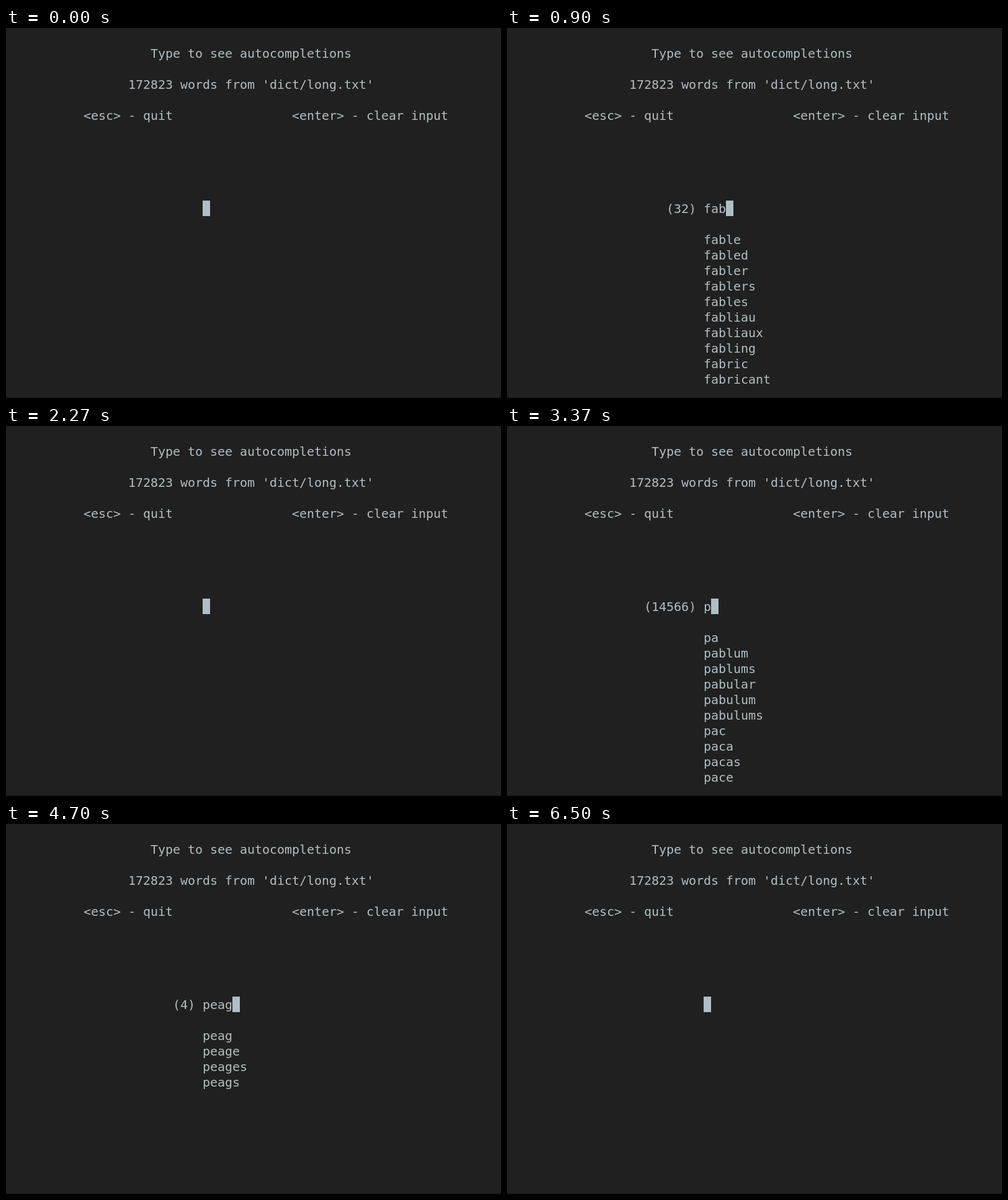
Write an HTML page with a canvas that moves like this. It is 798 by 596 pixels and loops after 8 s.

```html
<!DOCTYPE html>
<html lang="en">
<head>
<meta charset="utf-8">
<title>Autocompletion in a terminal</title>
<style>
  html, body { margin: 0; overflow: hidden; background: #202020; }
  canvas { display: block; }
</style>
</head>
<body>
<canvas id="screen" width="798" height="596"></canvas>
<script>
const ctx = document.getElementById('screen').getContext('2d');
const LOOP = 8000, CELL_W = 12, CELL_H = 25, LEFT = 5, TOP = 28;
const INPUT_COL = 26, INPUT_ROW = 10, MAX_WORDS = 10;
const BACK = '#202020', INK = '#b0bec5';

const words = ('fa fable fabled fabler fablers fables fabliau fabliaux fabling fabric fabricant ' +
  'pa pablum pablums pabular pabulum pabulums pac paca pacas pace ' +
  'pe pea peace peaceable peaceableness peaceablenesses peaceably peaced peaceful ' +
  'peacefuller peacefullest peag peage peages peags').split(' ');

// Totals in the full dictionary, where they exceed the words listed above
const totals = { f: 6767, fa: 754, fab: 32, p: 14566, pe: 2003, pea: 124 };

// [start in ms, input]
const typing = [
  [0, ''],
  [630, 'f'], [730, 'fa'], [820, 'fab'], [910, 'fabl'], [1000, 'fable'], [1090, 'fabled'],
  [2100, ''],
  [3370, 'p'], [3590, 'pe'], [3820, 'pea'], [4700, 'peag'], [5630, 'peage'], [5730, 'peages'],
  [6300, '']
];

// Each character sits in its own terminal cell
function print(col, row, text) {
  [...text].forEach((ch, i) =>
    ctx.fillText(ch, LEFT + (col + i) * CELL_W, TOP + row * CELL_H + 20));
}

function draw(input) {
  ctx.fillStyle = BACK;
  ctx.fillRect(0, 0, 798, 596);
  ctx.fillStyle = '#1a1a1a';
  ctx.fillRect(0, 594, 798, 2);

  ctx.fillStyle = INK;
  ctx.font = '20px "DejaVu Sans Mono", monospace';
  print(19, 0, 'Type to see autocompletions');
  print(16, 2, "172823 words from 'dict/long.txt'");
  print(10, 4, '<esc> - quit');
  print(38, 4, '<enter> - clear input');

  if (input) {
    const found = words.filter(word => word.startsWith(input));
    const count = `(${totals[input] || found.length}) `;
    print(INPUT_COL - count.length, INPUT_ROW, count + input);
    found.slice(0, MAX_WORDS).forEach((word, i) => print(INPUT_COL, INPUT_ROW + 2 + i, word));
  }
  ctx.fillRect(LEFT + (INPUT_COL + input.length) * CELL_W, TOP + INPUT_ROW * CELL_H, CELL_W, CELL_H);
}

function frame() {
  const t = performance.now() % LOOP;
  draw(typing.findLast(([start]) => start <= t)[1]);
  requestAnimationFrame(frame);
}
frame();
</script>
</body>
</html>
```
